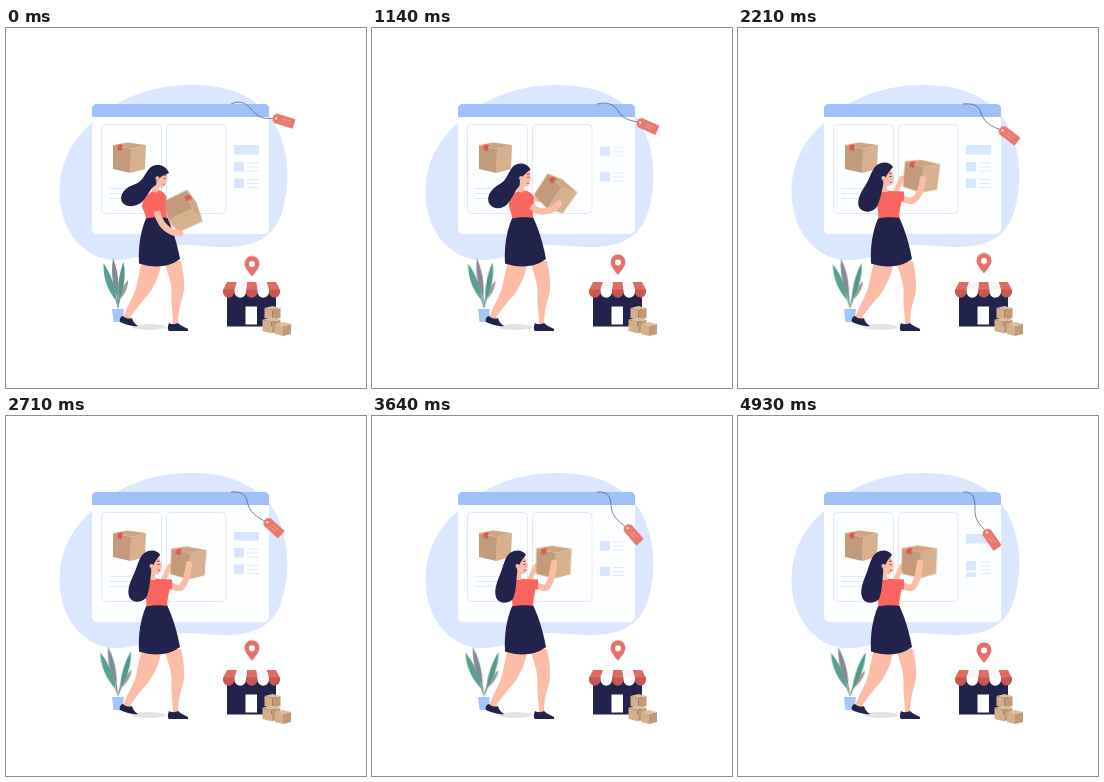
Write an HTML page that moves like this. It is 360 px wide and 360 px high and loops after 5 s.

```html
<!DOCTYPE html>
<html lang="en">
<head>
<meta charset="utf-8">
<title>Shop delivery</title>
<style>
html, body { margin: 0; width: 100%; height: 100%; overflow: hidden; background: #fff; }
svg { display: block; width: 100vw; height: 100vh; }
.move { animation: 5s linear infinite; }
.skin { fill: #fdbca5; }
.navy { fill: #21234b; }
.limb { fill: none; stroke: #fdbca5; stroke-linecap: round; stroke-linejoin: round; }
.pale { fill: #d7e5fe; }
.rule { fill: none; stroke: #e0e9f8; stroke-width: 1; }

/* swinging price tag */
#tag { animation-name: tag; }
@keyframes tag {
  0% { transform: translate(267px, 89.5px) rotate(17deg); }
  14.2% { transform: translate(266.5px, 91px) rotate(21deg); }
  32.8% { transform: translate(264px, 96px) rotate(28deg); }
  44.2% { transform: translate(262px, 100.5px) rotate(37deg); }
  64.2% { transform: translate(256px, 107.5px) rotate(47deg); }
  82.8% { transform: translate(251px, 112.5px) rotate(51deg); }
  98.6%, 100% { transform: translate(247px, 114px) rotate(55deg); }
}
#cord { animation-name: cord; }
@keyframes cord {
  0% { d: path("M225 76C239 70 243 80 250 86C256 91 262 91 270 90"); }
  14.2% { d: path("M225 76C238 72 243 79 249 86C254 91 260 92 269 92"); }
  32.8% { d: path("M225 76C239 74 243 77 246 84C249 91 256 94 267 97"); }
  44.2% { d: path("M225 76C237 75 241 78 243 85C246 94 253 99 264 102"); }
  64.2% { d: path("M225 76C237 75 239 81 240 88C241 98 247 103 258 110"); }
  82.8% { d: path("M225 76C237 75 238 83 238 91C238 101 243 107 253 115"); }
  98.6%, 100% { d: path("M225 76C236 75 237 84 237 92C236 102 241 109 249 116"); }
}

/* lifting the parcel */
#parcel { animation-name: parcel; }
@keyframes parcel {
  0% { transform: translate(177px, 183.5px) rotate(64deg) scale(1.07); animation-timing-function: ease-in; }
  14.2% { transform: translate(182px, 177px) rotate(49deg) scale(1.07); }
  32.8% { transform: translate(185px, 153.5px) rotate(14deg) scale(1.07); animation-timing-function: ease-out; }
  44.2% { transform: translate(183.5px, 148px) rotate(5deg) scale(1.07); animation-timing-function: ease-out; }
  64.2% { transform: translate(182px, 146px) rotate(1deg) scale(1.07); }
  98.6%, 100% { transform: translate(181.5px, 145.5px) scale(1.07); }
}
#arm { animation-name: arm; }
@keyframes arm {
  0% { d: path("M151 177C150 186 154 195 160 200C165 204 169 206 174 205"); animation-timing-function: ease-in; }
  14.2% { d: path("M150 175C152 184 158 189 166 191C174 193 180 194 186 192"); }
  32.8% { d: path("M160 168C166 172 172 176 177 175C183 172 187 165 188 157"); animation-timing-function: ease-out; }
  44.2% { d: path("M161 168C167 172 172 174 176 172C181 168 184 160 185 151"); animation-timing-function: ease-out; }
  64.2%, 100% { d: path("M161 167C167 171 172 173 175 171C179 166 181 158 182 147"); }
}
#sleeve { animation-name: sleeve; }
@keyframes sleeve {
  0% { d: path("M148 170L151 183"); animation-timing-function: ease-in; }
  14.2% { d: path("M147 170L154 184"); }
  32.8% { d: path("M150 168L165 171"); }
  44.2%, 100% { d: path("M150 168L166 168.5"); }
}
#far-arm { animation-name: far-arm; }
@keyframes far-arm {
  0% { d: path("M156 175C158 185 165 195 172 200"); }
  14.2% { d: path("M156 172C161 180 166 186 172 188"); }
  32.8% { d: path("M158 165C161 160 165 156 168 153"); }
  44.2%, 100% { d: path("M157 166C159 160 161 156 164 150"); }
}
.head { transform-origin: 146px 162px; animation-name: head; }
@keyframes head {
  0% { transform: translate(3px, 0) rotate(14deg); animation-timing-function: ease-in; }
  14.2% { transform: translate(3px, 0) rotate(11deg); }
  32.8% { transform: translate(1px, 0) rotate(2deg); animation-timing-function: ease-out; }
  44.2%, 100% { transform: none; }
}
#hair { animation-name: hair; }
@keyframes hair {
  0% { d: path("M163 145C160 137 151 135 145 139C138 145 138 154 127 157C118 160 113 168 116 174C120 180 130 179 136 174C142 168 144 160 150 157C151 151 155 148 163 145Z"); animation-timing-function: ease-in; }
  14.2% { d: path("M161 143C158 136 150 134 144 138C137 144 137 153 127 156C118 160 113 168 116 174C120 181 130 180 135 175C141 169 143 161 149 157C149 151 153 147 161 143Z"); }
  32.8% { d: path("M156 140C153 135 146 133 140 137C134 143 134 152 127 157C119 163 116 170 118 176C121 183 130 183 135 178C140 172 142 166 146 158C146 152 150 146 156 140Z"); animation-timing-function: ease-out; }
  44.2% { d: path("M155 139C152 134 145 133 139 137C133 142 132 151 127 158C121 167 119 174 121 179C124 185 133 185 138 180C142 173 143 167 145 158C145 152 149 146 155 139Z"); animation-timing-function: ease-out; }
  64.2%, 100% { d: path("M154 139C151 134 144 133 138 137C132 142 131 152 127 161C123 171 122 178 125 183C128 188 136 188 141 183C144 176 144 168 145 158C145 152 148 146 154 139Z"); }
}
#shirt { animation-name: shirt; }
@keyframes shirt {
  0% { d: path("M149 162C142 165 136 172 136 179C138 183 140 188 140 192L161 192C160 184 161 177 160 168C157 163 153 161 149 162Z"); animation-timing-function: ease-in; }
  14.2% { d: path("M148 162C141 165 135 172 135 178C137 183 140 188 140 192L161 192C160 184 161 177 160 168C157 163 153 161 148 162Z"); }
  32.8%, 100% { d: path("M144 163C140 167 139 172 139 178C140 183 141 188 140 192L162 192C160 186 163 179 164 170C161 163 152 162 144 163Z"); }
}

/* sidebar entries scroll through */
#bar { animation-name: bar; }
@keyframes bar {
  0%, 4% { transform: none; }
  9% { transform: translateY(-48px); }
  9.01%, 28% { transform: translateY(48px); }
  32.8% { transform: translateY(15px); animation-timing-function: ease-out; }
  38%, 54% { transform: none; }
  59% { transform: translateY(-48px); }
  59.01%, 94% { transform: translateY(48px); animation-timing-function: ease-out; }
  98.6% { transform: translateY(1px); }
}
#row1 { animation-name: row1; }
@keyframes row1 {
  0%, 4% { transform: none; }
  9% { transform: translateY(-48px); }
  9.01%, 29% { transform: translateY(48px); }
  32.8% { transform: translateY(20px); animation-timing-function: ease-out; }
  39%, 54% { transform: none; }
  59% { transform: translateY(-48px); }
  59.01%, 95% { transform: translateY(48px); animation-timing-function: ease-out; }
  98.6%, 100% { transform: translateY(11px); }
}
#row2 { animation-name: row2; }
@keyframes row2 {
  0%, 4% { transform: none; }
  9% { transform: translateY(-48px); }
  9.01%, 33% { transform: translateY(30px); animation-timing-function: ease-out; }
  40%, 54% { transform: none; }
  59% { transform: translateY(-48px); }
  59.01%, 95% { transform: translateY(30px); animation-timing-function: ease-out; }
  98.6%, 100% { transform: translateY(6px); }
}
#pair { animation-name: pair; }
@keyframes pair {
  0%, 8% { transform: translateY(48px); animation-timing-function: ease-out; }
  13.5%, 22% { transform: none; }
  28% { transform: translateY(-48px); }
  28.01%, 57% { transform: translateY(48px); animation-timing-function: ease-out; }
  63%, 74% { transform: none; }
  80%, 100% { transform: translateY(-48px); }
}

/* plant and map pin */
.leaf { transform-origin: 112px 280px; animation-name: leaf; }
@keyframes leaf {
  from { transform: none; }
  64.2% { transform: rotate(calc(var(--lean) * .85)); }
  to { transform: rotate(var(--lean)); }
}
#pin { animation-name: pin; }
@keyframes pin {
  0% { transform: translateY(1.5px); }
  64.2% { transform: translateY(-3px); }
  100% { transform: translateY(0); }
}
</style>
</head>
<body>
<svg viewBox="0 0 360 360">
  <defs>
    <g id="box">
      <path fill="#d7b18f" d="M1.5-8.5 16.5-12.5 15.5 11.5 1 15.5Z"/>
      <path fill="#c39a7a" d="M-16.5-12.5 1.5-8.5 1 15.5-16.5 11.5Z"/>
      <path fill="#d0a480" d="M-16.5-12.5-2-15 16.5-12.5 1.5-8.5Z"/>
      <path fill="#dc5952" d="M-12-11.5-9-13-6.500-12.500-7.500-10.500V-6.500L-12-7.500Z"/>
    </g>
    <g id="crate">
      <path fill="#d5ae8a" d="M0 2 8 4V14L0 12Z"/>
      <path fill="#c29876" d="M8 4 16 2V12L8 14Z"/>
      <path fill="#dfbd9b" d="M0 2 8 0 16 2 8 4Z"/>
    </g>
    <g id="row">
      <rect class="pale" x="228" width="10" height="9.5"/>
      <path class="rule" d="M241 1H253M241 5H252M241 9H253"/>
    </g>
    <clipPath id="list"><path d="M225 116H257V161H225Z"/></clipPath>
  </defs>

  <path fill="#dae7fe" d="M54 154C57 128 70 108 87 94C112 70 146 57 184 57C231 56 263 76 274 107C283 130 284 158 276 184C268 209 250 219 218 219C192 219 171 213 149 222C133 230 119 233 104 232C68 226 50 190 54 154Z"/>

  <!-- web page -->
  <rect x="86" y="76" width="177" height="130" rx="5" fill="#fdfeff"/>
  <path fill="#9fc0fa" d="M86 89V81Q86 76 91 76H258Q263 76 263 81V89Z"/>
  <g fill="none" stroke="#dfe6f0" stroke-width=".9">
    <rect x="95.5" y="96.5" width="60" height="89" rx="4"/>
    <rect x="160.5" y="96.5" width="59.5" height="89" rx="4"/>
  </g>
  <path class="rule" d="M103 160.5H127M103 165.5H125M103 170.5H127"/>
  <use href="#box" x="123.5" y="129.5"/>
  <g clip-path="url(#list)">
    <rect id="bar" class="move pale" x="228" y="117" width="25" height="9.5"/>
    <g id="row1" class="move"><use href="#row" y="134"/></g>
    <g id="row2" class="move"><use href="#row" y="150.5"/></g>
    <g id="pair" class="move"><use href="#row" y="125"/><use href="#row" y="150.5"/></g>
  </g>

  <path id="cord" class="move" fill="none" stroke="#59647e" stroke-width=".8" d="M225 76C239 70 243 80 250 86C256 91 262 91 270 90"/>
  <g id="tag" class="move">
    <path fill="#e9786e" d="M0-2.5 3-5H21Q22-5 22-4V4Q22 5 21 5H3L0 2.5Z"/>
    <circle cx="3.2" r="1.1" fill="#fff"/>
    <path stroke="#f3a59d" stroke-width=".7" d="M9-1.5H17M9 1.5H15"/>
  </g>

  <!-- plant -->
  <path class="move leaf" style="--lean:11deg" fill="#a69c9c" d="M112 281C112.5 276 112.500 273 113.500 269C115 262 118 256 122 252C122.500 259 119 266 114.500 271C113.500 274 113 278 112 281Z"/>
  <path class="move leaf" style="--lean:-8deg" fill="#858996" d="M112 281C111.500 277 111.500 274 110.500 268C106 256 105 242 107 230C112 242 113.500 256 112 268C112.500 273 112.500 277 112 281Z"/>
  <path class="move leaf" style="--lean:13deg" fill="#4f998a" d="M112 281C112 277 112 274 112.500 270C111.500 257 113.500 244 117.500 234C120 246 118.500 260 113.500 271C113 275 112.500 278 112 281Z"/>
  <path class="move leaf" style="--lean:-6deg" fill="#58a08f" d="M112 281C111 278 110.500 275 109.500 272C101 261 97 249 97.500 235C105 246 109 258 110.500 271C111.500 275 112 278 112 281Z"/>
  <path fill="#a5c6fa" d="M106 281H118L116.5 294H107.5Z"/>

  <!-- shop -->
  <path class="navy" d="M221 262H270V298.5H221Z"/>
  <path fill="#fff" d="M239.5 278.5H251V296.5H239.5Z"/>
  <path fill="#de6c65" d="M221 254H231L228.5 262H217ZM241 254H250.5L251.5 262H240ZM260.5 254H270L274 262H263Z"/>
  <path fill="#f6f7fa" d="M231 254H241L240 262H228.5ZM250.5 254H260.5L263 262H251.5Z"/>
  <path fill="#c9564f" d="M217 261.5H228.5V264A5.7 5.7 0 0 1 217 264ZM240 261.5H251.5V264A5.7 5.7 0 0 1 240 264ZM263 261.5H274V264A5.5 5.5 0 0 1 263 264Z"/>
  <path fill="#fff" d="M228.5 261.5H240V264A5.7 5.7 0 0 1 228.5 264ZM251.5 261.5H263V264A5.7 5.7 0 0 1 251.5 264Z"/>
  <use href="#crate" x="258.5" y="278"/>
  <use href="#crate" transform="translate(256.5 289.5) scale(1.12)"/>
  <use href="#crate" x="269" y="294"/>
  <path id="pin" class="move" fill="#e57268" fill-rule="evenodd" d="M246 247C242 242 238.5 238 238.5 234A7.5 7.5 0 0 1 253.5 234C253.5 238 250 242 246 247ZM243 234.5A3 3 0 1 0 249 234.5A3 3 0 1 0 243 234.5Z"/>

  <!-- woman -->
  <ellipse cx="143" cy="299" rx="17" ry="3" fill="#e2e3e6"/>
  <path class="skin" d="M136 233H156C153 248 149 257 142 267C134 276 127 284 122 293L117 290C121 278 127 270 130 260C132 250 134 241 136 233Z"/>
  <path class="skin" d="M158 233H175C178 248 180 260 176 271C173 280 172 288 172 297H167C167 286 165 277 165.500 267C166 256 162 246 158 233Z"/>
  <path class="navy" d="M117 288C120 291 124 291 126 290C127 294 129 296 132 298C126 299 119 296 114 294C113 291 115 288 117 288Z"/>
  <path class="navy" d="M163 295C166 297 170 296 172 295C175 298 179 299 182 301V303H163C161 301 162 298 163 295Z"/>
  <path id="far-arm" class="move limb" stroke-width="5" d="M156 175C158 185 165 195 172 200"/>
  <path id="shirt" class="move" fill="#fb655f" d="M149 162C142 165 136 172 136 179C138 183 140 188 140 192L161 192C160 184 161 177 160 168C157 163 153 161 149 162Z"/>
  <path class="navy" d="M140 190.5C147 189 156 189 161.5 190C167 202 171.500 217 174 231C162 240 147 240 133 235.500C132 219 134.500 203 140 190.500Z"/>
  <g class="move head">
    <path class="skin" d="M143 142 152.5 139C154 143 154.500 146 156 150.500L154.500 152C155 157 152.500 158.500 149 158L149.500 164H143Z"/>
    <path fill="none" stroke="#3a2d4a" stroke-width=".8" d="M151 145.5 153.5 145M151.5 148.5H153.5"/>
    <path stroke="#e0504f" d="M152 154.5 154.500 154"/>
  </g>
  <path id="hair" class="move navy" d="M163 145C160 137 151 135 145 139C138 145 138 154 127 157C118 160 113 168 116 174C120 180 130 179 136 174C142 168 144 160 150 157C151 151 155 148 163 145Z"/>
  <g class="move head">
    <circle class="skin" cx="145.5" cy="150" r="2"/>
    <circle cx="145.5" cy="153" r=".8" fill="#fff"/>
  </g>
  <g id="parcel" class="move"><use href="#box"/></g>
  <path id="arm" class="move limb" stroke-width="6.5" d="M151 177C150 186 154 195 160 200C165 204 169 206 174 205"/>
  <path id="sleeve" class="move" fill="none" stroke="#fb655f" stroke-width="10" d="M148 170L151 183"/>
</svg>
</body>
</html>
```
